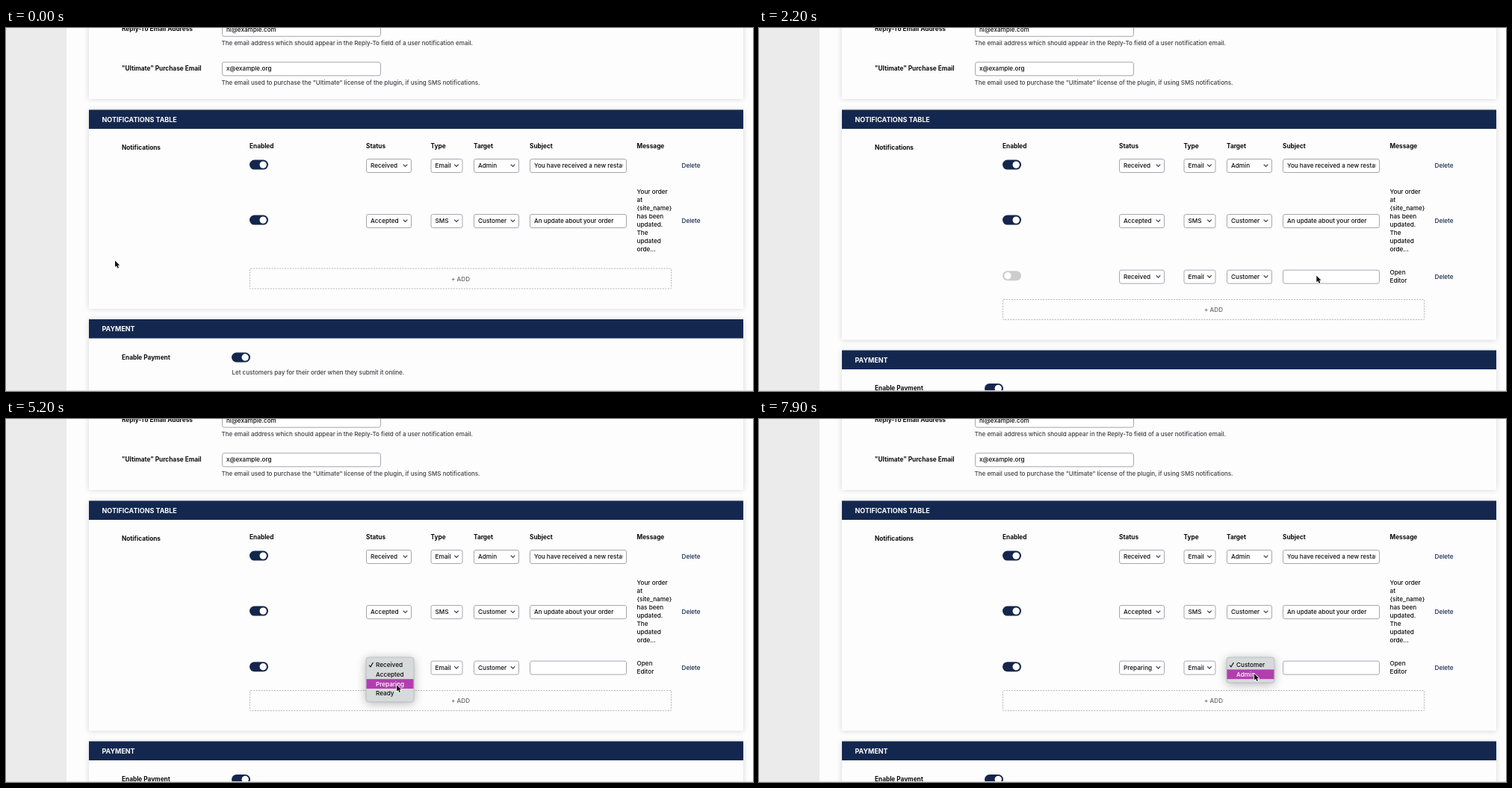
Animation of 1000x486 px, one loop 8 s. Source, as an HTML page with a canvas:

```html
<!DOCTYPE html>
<html lang="en">
<head>
<meta charset="utf-8">
<title>Notifications table</title>
<style>
  html, body { margin: 0; width: 100%; height: 100%; overflow: hidden; background: #fdfdfd; }
  canvas { display: block; }
</style>
</head>
<body>
<canvas id="stage" width="1000" height="486"></canvas>
<script>
const ctx = document.getElementById('stage').getContext('2d');
const LOOP = 8000, STEP = 100;
const FONT = 'Inter, "Open Sans", sans-serif';
const PAGE = '#fdfdfd', NAVY = '#14284f', INK = '#0c0c0e', SOFT = '#3e3e42',
  LINE = '#a6a6b0', PALE = '#ebebeb', PINK = '#b23eae';

const clamp = v => Math.max(0, Math.min(1, v));
const span = (t, a, b) => clamp((t - a) / (b - a));
const smooth = p => p * p * (3 - 2 * p);
const mix = (a, b, p) => a + (b - a) * p;

// time, x, y of the pointer tip
const path = [
  [0, 146, 311.5], [1000, 582, 328], [1800, 582, 328], [2500, 853, 334],
  [2650, 853, 334], [3100, 340, 331.5], [3500, 340, 331.5], [4000, 521, 334],
  [4300, 521, 336], [4450, 521, 336], [5000, 523, 356], [5400, 523, 356],
  [5700, 594, 333], [6100, 594, 333], [6400, 597, 342], [6500, 597, 342],
  [6800, 598, 328], [7100, 598, 328], [7500, 661, 331], [7600, 661, 331],
  [7900, 663, 341], [8000, 663, 341]
];

function pointerAt(t) {
  const i = Math.max(1, path.findIndex(p => p[0] > t));
  const [t0, x0, y0] = path[i - 1], [t1, x1, y1] = path[i];
  const p = smooth(span(t, t0, t1));
  return [mix(x0, x1, p), mix(y0, y1, p)];
}

// y is the middle of the capitals
function text(s, x, y, { size = 8.1, weight = 500, color = INK, align = 'left' } = {}) {
  ctx.font = `${weight} ${size}px ${FONT}`;
  ctx.fillStyle = color;
  ctx.textAlign = align;
  ctx.fillText(s, x, y + size * 0.365);
}

const label = (s, x, y) => text(s, x, y, { size: 8.25, weight: 700 });
const note = (s, x, y) => text(s, x, y, { size: 8.02, color: SOFT });

function box(x, y, w, h, r, fill, stroke) {
  ctx.beginPath();
  ctx.roundRect(x, y, w, h, r);
  if (fill) { ctx.fillStyle = fill; ctx.fill(); }
  if (stroke) { ctx.strokeStyle = stroke; ctx.lineWidth = 1; ctx.stroke(); }
}

function glow(color, blur, y, draw) {
  ctx.save();
  ctx.shadowColor = color;
  ctx.shadowBlur = blur;
  ctx.shadowOffsetY = y;
  draw();
  ctx.restore();
}

function card(top, bottom) {
  glow('rgba(0,0,20,.16)', 7, 0, () => box(111, top, 876, bottom - top, 0, PAGE));
}

function header(s, y) {
  ctx.fillStyle = NAVY;
  ctx.fillRect(111, y, 876, 25.5);
  text(s, 128.5, y + 12.8, { size: 8.95, weight: 700, color: '#fff' });
}

function field(x, y, w, s) {
  box(x + .5, y - 8.5, w - 1, 18, 2.5, '#fff', LINE);
  ctx.save();
  ctx.beginPath();
  ctx.rect(x, y - 9, w - 5.5, 18);
  ctx.clip();
  text(s, x + 6, y);
  ctx.restore();
}

function select(x, y, w, s) {
  box(x + .5, y - 8.5, w - 1, 18, 2.5, '#fff', LINE);
  text(s, x + 6, y, { size: 8.2 });
  const cx = x + w - 8.5;
  ctx.beginPath();
  ctx.moveTo(cx - 2.8, y - 1.4);
  ctx.lineTo(cx, y + 1.5);
  ctx.lineTo(cx + 2.8, y - 1.4);
  ctx.strokeStyle = '#3c3c44';
  ctx.lineWidth = 1.2;
  ctx.stroke();
}

function toggle(x, y, on = 1) {
  const c = [[204, 20], [204, 38], [204, 76]].map(([a, b]) => Math.round(mix(a, b, on)));
  box(x, y - 6.5, 25, 13, 6.5, `rgb(${c})`);
  ctx.beginPath();
  ctx.arc(x + mix(7, 18.2, on), y, 4.7, 0, 7);
  ctx.fillStyle = '#fff';
  ctx.fill();
}

function row(y, status, type, target, subject, on) {
  toggle(326, y - .9, on);
  select(482, y, 61, status);
  select(568.5, y, 43, type);
  select(626, y, 61, target);
  field(701, y, 130, subject);
  text('Delete', 904.5, y, { size: 8.2, color: NAVY });
}

function message(lines, y) {
  lines.forEach((s, i) => text(s, 844.5, y + i * 11, { size: 8.2 }));
}

function menu(x, w, items, hot) {
  const top = 319, h = items.length * 12.8 + 8.6;
  glow('rgba(0,0,20,.3)', 13, 2, () => box(x, top, w, h, 3.5, '#d6dada'));
  box(x, top, w, h, 3.5, null, 'rgba(160,164,164,.5)');
  items.forEach((s, i) => {
    const y = 329 + i * 12.8, color = i === hot ? '#fff' : INK;
    if (i === hot) {
      ctx.fillStyle = PINK;
      ctx.fillRect(x + .5, y - 6.4, w - 1, 12.8);
    }
    text(s, x + 13, y, { size: 8.2, color });
    if (i) return;
    ctx.beginPath();
    ctx.moveTo(x + 4, y + .6);
    ctx.lineTo(x + 6, y + 2.8);
    ctx.lineTo(x + 9.4, y - 3);
    ctx.strokeStyle = color;
    ctx.lineWidth = 1.1;
    ctx.stroke();
  });
}

const arrow = new Path2D('M0 0V8.6L2 6.8 3.4 10 5 9.3 3.6 6.2H6.2Z');
const hand = new Path2D('M-1 .8Q0-.6 1 .8V4L4.6 4.8Q5.6 5.2 5.4 6.6L4.4 10.8H-.8L-3.4 7Q-3.6 5.4-2.2 5.9L-1 7Z');

function pointer(x, y, isHand) {
  ctx.save();
  ctx.translate(x, y);
  ctx.lineJoin = 'round';
  ctx.lineWidth = 1.6;
  ctx.strokeStyle = isHand ? '#111' : '#fff';
  ctx.fillStyle = isHand ? '#fff' : '#111';
  const shape = isHand ? hand : arrow;
  ctx.stroke(shape);
  ctx.fill(shape);
  if (isHand) {
    ctx.beginPath();
    for (const fx of [1, 2.7]) { ctx.moveTo(fx, 6.4); ctx.lineTo(fx, 9); }
    ctx.lineWidth = .8;
    ctx.stroke();
  }
  ctx.restore();
}

function addButton(y, hover) {
  if (hover) {
    ctx.globalAlpha = hover;
    box(326, y, 565, 28, 0, PALE);
    ctx.globalAlpha = 1;
  }
  ctx.setLineDash([2, 1.5]);
  box(326.5, y + .5, 564, 27, 1, null, '#b4b4b8');
  ctx.setLineDash([]);
  text('+ ADD', 608.5, y + 14.3, { color: '#66666a', align: 'center' });
}

function draw(t) {
  const shift = t >= 1400 ? 41.5 : 0;

  ctx.fillStyle = PAGE;
  ctx.fillRect(0, 0, 1000, 486);
  ctx.fillStyle = PALE;
  ctx.fillRect(0, 0, 81, 486);

  card(-20, 95);
  label('Reply-To Email Address', 155, 1);
  field(289, 1.7, 213, 'hi@example.com');
  note('The email address which should appear in the Reply-To field of a user notification email.', 288.5, 20);
  label('"Ultimate" Purchase Email', 155, 53.5);
  field(289, 54.3, 213, 'x@example.org');
  note('The email used to purchase the "Ultimate" license of the plugin, if using SMS notifications.', 288.5, 73);

  card(110, 376 + shift);
  header('NOTIFICATIONS TABLE', 109.5);
  label('Notifications', 155, 160);
  const heads = { Enabled: 326, Status: 482, Type: 568.5, Target: 626, Subject: 701, Message: 844.5 };
  for (const s in heads) label(s, heads[s], 158);

  row(184, 'Received', 'Email', 'Admin', 'You have received a new restaurant order');
  row(258, 'Accepted', 'SMS', 'Customer', 'An update about your order');
  message(['Your order', 'at', '{site_name}', 'has been', 'updated.', 'The', 'updated', 'orde...'], 219.3);

  if (t >= 1600) {
    const p = span(t, 3150, 3550);
    ctx.globalAlpha = span(t, 1500, 1800);
    row(332.6, t < 5400 ? 'Received' : 'Preparing', 'Email', 'Customer', '', 1 - (1 - p) ** 2);
    message(['Open', 'Editor'], 327.5);
    ctx.globalAlpha = 1;
  }
  addButton(321.5 + shift, span(t, 600, 800) * (1 - span(t, 1800, 2000)));

  card(390 + shift, 520);
  header('PAYMENT', 390 + shift);
  label('Enable Payment', 155, 440.5 + shift);
  toggle(302, 441 + shift);
  note('Let customers pay for their order when they submit it online.', 302.5, 461 + shift);

  ctx.fillStyle = '#dcdcde';
  ctx.fillRect(0, 485, 1000, 1);

  if (t >= 4100 && t < 5400) {
    menu(482, 64, ['Received', 'Accepted', 'Preparing', 'Ready'], t < 4600 ? 0 : t < 4900 ? 1 : 2);
  } else if (t >= 5800 && t < 7100) {
    menu(568.5, 46.5, ['Email', 'SMS'], t >= 6300 && t < 6700 ? 1 : 0);
  } else if (t >= 7500) {
    menu(626, 64, ['Customer', 'Admin'], t < 7800 ? 0 : 1);
  }

  const isHand = (t >= 700 && t < 1900) || (t >= 3100 && t < 3600);
  pointer(...pointerAt(t), isHand);
}

const start = performance.now();
function tick() {
  const t = (performance.now() - start) % LOOP;
  draw(Math.floor(t / STEP) * STEP);
  requestAnimationFrame(tick);
}
tick();
</script>
</body>
</html>
```
